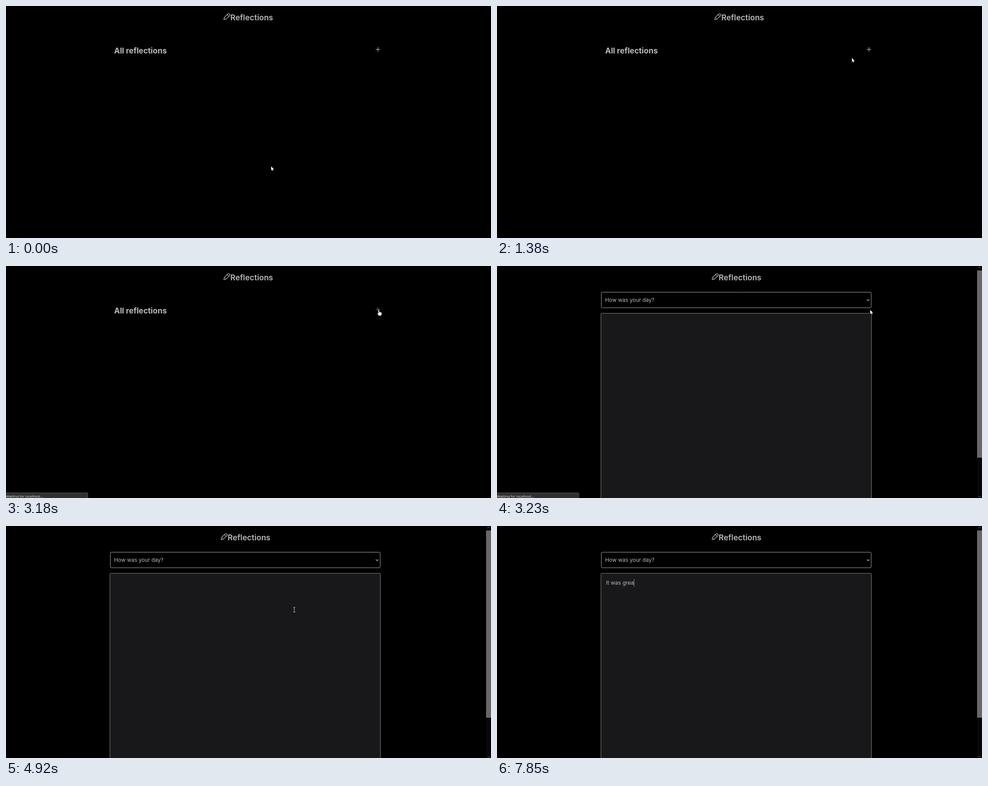
Write an HTML page with a canvas that moves like this. It is 1081 px wide and 518 px high and loops after 8000 ms.

```html
<!DOCTYPE html>
<html lang="en">
<head>
<meta charset="utf-8">
<title>Reflections</title>
<style>
html, body { margin: 0; width: 100%; height: 100%; overflow: hidden; background: #000; }
canvas { display: block; }
</style>
</head>
<body>
<canvas id="stage" width="1081" height="518"></canvas>
<script>
const ctx = document.getElementById('stage').getContext('2d');
const LOOP = 8000, LOADED = 3230;
const INK = '#b9b9b9';
const SANS = 'Inter, "Open Sans", sans-serif';
const ENTRY = 'It was grea';
const KEYS = [5250, 5730, 5980, 6150, 6350, 6430, 6510, 7030, 7370, 7550, 7850];
// start, end, then start, control and end points
const MOVES = [
  [370, 700, 591, 358, 640, 285, 697, 209],
  [1030, 1380, 697, 209, 740, 160, 791, 116],
  [1730, 2110, 791, 116, 815, 108, 831, 99],
  [2260, 2300, 831, 99, 831, 98, 831, 98],
  [3530, 4290, 832, 98, 700, 205, 642, 187]
];

const within = (t, a, b) => t >= a && t < b;
const clamp = v => Math.max(0, Math.min(1, v));

function pointer(t) {
  let m = MOVES[0];
  for (const next of MOVES) if (t >= next[0]) m = next;
  let u = clamp((t - m[0]) / (m[1] - m[0]));
  u = u * u * (3 - 2 * u);
  const at = i => Math.round((1 - u) ** 2 * m[i] + 2 * u * (1 - u) * m[i + 2] + u * u * m[i + 4]);
  return [at(2), at(3)];
}

function text(str, x, y, font, color = INK) {
  ctx.font = font;
  ctx.fillStyle = color;
  ctx.fillText(str, x, y);
}

function box(x, y, w, h, r, fill, stroke) {
  ctx.beginPath();
  ctx.roundRect(x, y, w, h, r);
  ctx.fillStyle = fill;
  ctx.fill();
  ctx.strokeStyle = stroke;
  ctx.lineWidth = 1;
  ctx.stroke();
}

function line(points, color, width = 1) {
  ctx.beginPath();
  points.forEach(p => ctx.lineTo(p[0], p[1]));
  ctx.strokeStyle = color;
  ctx.lineWidth = width;
  ctx.stroke();
}

function at(x, y, draw) {
  ctx.save();
  ctx.translate(x, y);
  draw();
  ctx.restore();
}

function pencil() {
  ctx.rotate(-Math.PI / 4);
  ctx.lineJoin = 'round';
  line([[0.5, 0], [5, -2.8], [17, -2.8], [18.4, -1.4], [18.4, 1.4], [17, 2.8], [5, 2.8], [0.5, 0]], INK, 1.2);
  line([[14, -2.8], [14, 2.8]], INK, 1.1);
  line([[5, -2.8], [5, 2.8]], INK, 0.9);
}

function header(x) {
  at(x, 31, pencil);
  text('Reflections', x + 15, 32, '600 17.5px ' + SANS);
}

function listPage(hover) {
  header(485);
  text('All reflections', 241, 105.5, '700 17.3px ' + SANS);
  const color = hover ? '#747474' : INK;
  line([[824, 97], [834, 97]], color, 1.2);
  line([[829, 92], [829, 102]], color, 1.2);
}

function scrollbar() {
  ctx.fillStyle = '#07070a';
  ctx.fillRect(1070, 0, 11, 518);
  ctx.fillStyle = '#686868';
  ctx.fillRect(1070, 10, 11, 418);
  line([[1073, 4.5], [1075.7, 1.8], [1078.4, 4.5]], '#707070');
  line([[1073, 513.8], [1075.7, 516.5], [1078.4, 513.8]], '#707070');
}

function formPage(t) {
  header(479);
  box(232.5, 58.5, 601.5, 34.7, 2, '#000', '#a8a8a8');
  text('How was your day?', 241, 80, '400 11.9px ' + SANS);
  line([[824.4, 74.7], [827.2, 77.5], [830, 74.7]], INK, 1.3);
  box(231.7, 105.6, 602.8, 430, 2, '#18181a', '#858585');
  scrollbar();

  const typed = ENTRY.slice(0, KEYS.filter(k => t >= k).length);
  text(typed, 243, 131, '400 11.9px ' + SANS);
  const caretOn = t >= 4380 && !within(t, 4920, 5250) && !within(t, 6510, 6750);
  if (caretOn) {
    ctx.fillStyle = '#aaa684';
    ctx.fillRect(243 + Math.round(ctx.measureText(typed).width), 119, 1, 16);
  }
}

function statusBar(t) {
  ctx.globalAlpha = clamp((t - 2250) / 120);
  box(-1, 506.5, 183.3, 14, [0, 2, 0, 0], '#303030', '#565656');
  text(t < 3150 ? 'localhost:3000/new' : 'Waiting for localhost...',
    0, 517, '400 7.9px "Noto Sans", "Open Sans", sans-serif', '#dedede');
  ctx.globalAlpha = 1;
}

function shape(path) {
  const p = new Path2D(path);
  ctx.lineJoin = 'round';
  ctx.strokeStyle = '#000';
  ctx.lineWidth = 1.2;
  ctx.stroke(p);
  ctx.fillStyle = '#fff';
  ctx.fill(p);
}

const arrow = () => shape('M0 0V9L2 7.3L3.3 10L4.7 9.4L3.5 6.7L6 6.5Z');

function hand() {
  shape('M-.9 1Q0 -.3 .9 1V5Q1.8 4.3 2.6 5.3Q3.6 4.7 4.3 5.7Q6.2 5.2 6.2 7V9.5L5 12.8H-.2L-3 8.6Q-3.2 7.2 -2 7.5L-.9 8.5Z');
  for (const x of [1.1, 2.8, 4.5]) line([[x, 5.6], [x, 7.8]], '#555', 0.4);
}

function ibeam() {
  const c = '#c4c4c4';
  line([[0.5, -5], [0.5, 5]], c);
  line([[-2, -5], [3, -5]], c);
  line([[-2, 5], [3, 5]], c);
}

function halo(x, y) {
  ctx.beginPath();
  ctx.arc(x, y, 9, 0, 7);
  ctx.fillStyle = 'rgba(255,255,0,.47)';
  ctx.fill();
}

function render(t) {
  const [x, y] = pointer(t);
  const form = t >= LOADED;
  const hover = !form && x >= 824;
  ctx.fillStyle = '#000';
  ctx.fillRect(0, 0, 1081, 518);
  if (form) formPage(t); else listPage(hover);
  if (within(t, 2260, 3270)) statusBar(t);

  if (t < KEYS[0]) {
    const overText = form && y > 106 && x < 834;
    const tipX = form && t < 3530 ? 832 : x;
    at(tipX, y, hover ? hand : overText ? ibeam : arrow);
  }
  if (within(t, 2780, 2940)) halo(831, 98);
  if (within(t, 4380, 4560)) halo(641, 187);
}

const start = performance.now();
function tick() {
  render((performance.now() - start) % LOOP);
  requestAnimationFrame(tick);
}
tick();
</script>
</body>
</html>
```
